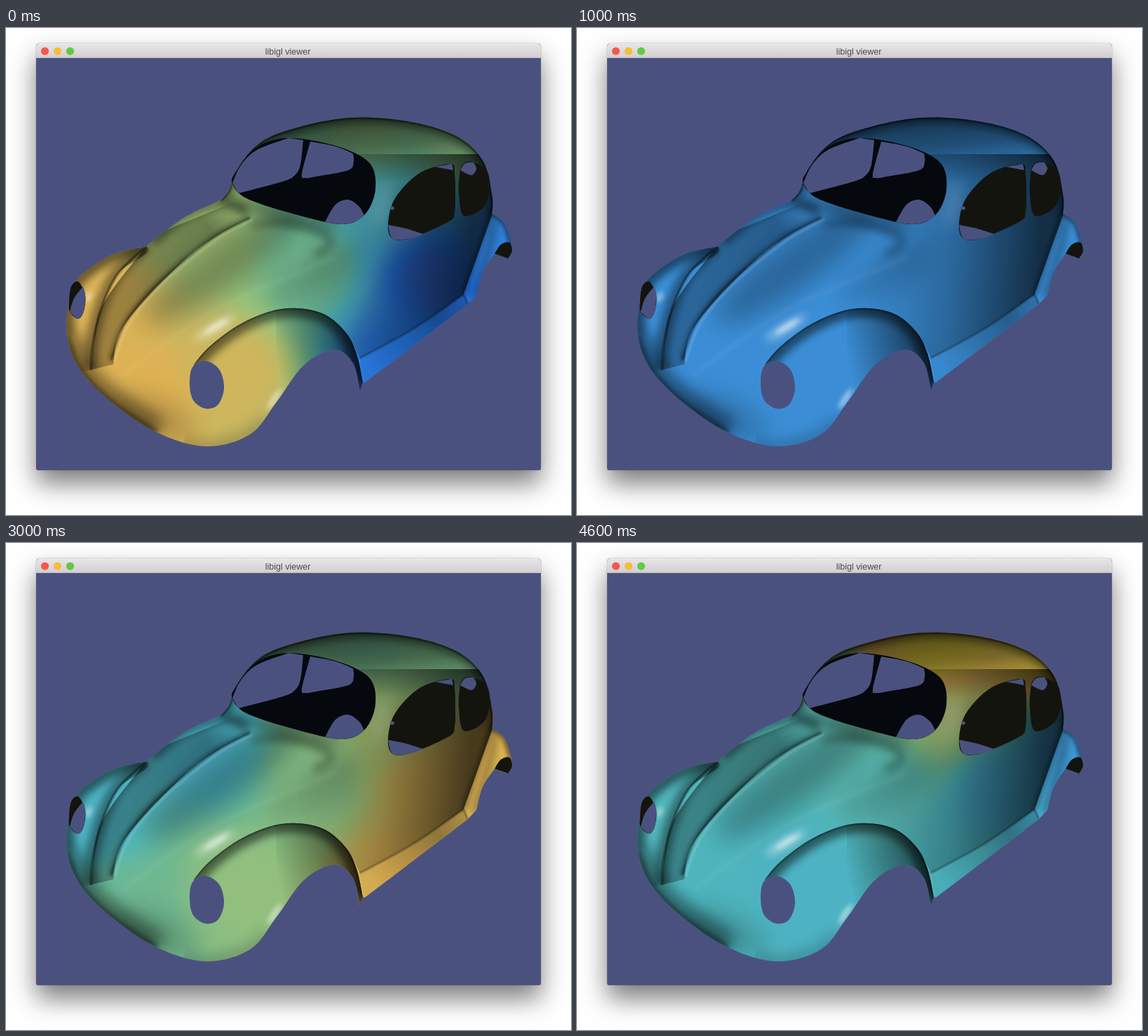
An HTML page with a canvas that plays this animation: 806 by 695 pixels, repeating every 5 s.

```html
<!DOCTYPE html>
<html lang="en">
<head>
<meta charset="utf-8">
<title>libigl viewer</title>
<style>
  html, body { margin: 0; width: 100%; height: 100%; overflow: hidden; background: #fff; }
  .window {
    position: absolute; left: 43px; top: 22px; width: 720px; height: 609px;
    border-radius: 5px 5px 3px 3px; background: #4b517f;
    box-shadow: 0 19px 36px rgba(0,0,0,.52), 0 0 2px rgba(0,0,0,.35);
  }
  .bar {
    height: 20px; border-bottom: 1px solid #b4b2b5; border-radius: 5px 5px 0 0;
    background: linear-gradient(#efedef, #e6e4e6 8%, #d1cfd1);
  }
  .paint, svg { position: absolute; left: 0; top: 0; width: 806px; height: 695px; }
  .paint { clip-path: url(#body); }
  canvas {
    position: absolute; left: 86px; top: 127px; width: 640px; height: 472px;
    animation: turn 5s step-end infinite;
  }
  @keyframes turn { 0% { opacity: 1; } 20%, 100% { opacity: 0; } }
  text { font: 12.5px "Liberation Sans", Arial, sans-serif; fill: #4c4a4c; text-anchor: middle; }
  .line { fill: none; stroke: #000; }
  .lit { stroke: #fff; }
  .b1 { filter: blur(1px); }
  .b3 { filter: blur(3px); }
  .b6 { filter: blur(6px); }
  .b10 { filter: blur(10px); }
  .b18 { filter: blur(18px); }
  .gap { fill: #4b517f; }
  .cabin { fill: #05080d; }
  .side { fill: #14140e; }
</style>
</head>
<body>
<div class="window"><div class="bar"></div></div>
<div class="paint"></div>
<svg viewBox="0 0 806 695">
  <defs>
    <clipPath id="body"><path data-p="200,312 158,321 125,339 100,361 90,390 87,440 106,488 152,535 215,577 285,597 348,580 385,535 425,481 468,459 495,478 505,518|509,505|512,506|659,394|671,381|680,348 697,322|715,329|722,314 711,279 693,265|694,242 680,189 640,153 572,133 490,128 412,143 362,164 330,201 318,232 306,246|255,270 212,302 200,312"/></clipPath>
    <clipPath id="door"><path data-p="400,330|500,180|694,180|694,265|653,380|580,430 505,471|485,435 455,409 415,400|400,330"/></clipPath>
    <clipPath id="fender"><path data-p="250,620|268,480|290,455 330,425 375,405 415,400 455,409 485,435 500,465 509,505|505,540|250,620"/></clipPath>
    <clipPath id="flank"><path data-p="60,300|200,312 160,350 136,400 124,450 121,488|60,500|60,300"/></clipPath>
    <clipPath id="hood"><path data-p="200,312 136,400 121,488|153,480|168,425 248,337 300,297 350,270|370,230|200,300|200,312"/></clipPath>

    <path id="roofline" data-p="306,246 318,232 330,201 362,164 412,143 490,128 572,133 640,153 680,189 694,242 693,265"/>
    <path id="arch" data-p="268,480 290,455 330,425 375,405 415,400 455,409 485,435 500,465 509,505"/>
    <path id="seam" data-p="200,312 160,350 136,400 124,450 121,488"/>
    <path id="crease" data-p="150,474 168,425 204,378 248,337 300,297 348,271"/>
    <path id="belly" data-p="87,440 106,488 152,535 215,577"/>

    <linearGradient id="roofShade" gradientUnits="userSpaceOnUse" x1="500" y1="128" x2="510" y2="225">
      <stop offset="0" stop-opacity=".62"/><stop offset=".45" stop-opacity=".44"/><stop offset="1" stop-opacity="0"/>
    </linearGradient>
    <linearGradient id="doorShade" gradientUnits="userSpaceOnUse" x1="415" y1="330" x2="660" y2="350">
      <stop offset="0" stop-opacity="0"/><stop offset=".5" stop-opacity=".28"/><stop offset="1" stop-opacity=".68"/>
    </linearGradient>
    <linearGradient id="hoodShade" gradientUnits="userSpaceOnUse" x1="180" y1="380" x2="348" y2="262">
      <stop offset="0" stop-opacity=".28"/><stop offset=".7" stop-opacity=".34"/><stop offset="1" stop-opacity="0"/>
    </linearGradient>
    <linearGradient id="archShade" gradientUnits="userSpaceOnUse" x1="385" y1="470" x2="505" y2="440">
      <stop offset="0" stop-opacity="0"/><stop offset="1" stop-opacity=".68"/>
    </linearGradient>
    <linearGradient id="sillShade" gradientUnits="userSpaceOnUse" x1="520" y1="480" x2="655" y2="385">
      <stop offset="0" stop-opacity=".04"/><stop offset=".7" stop-opacity=".34"/><stop offset="1" stop-opacity=".2"/>
    </linearGradient>
  </defs>

  <circle cx="55.5" cy="33" r="5.6" fill="#f4584f"/>
  <circle cx="73.5" cy="33" r="5.6" fill="#f9bc36"/>
  <circle cx="91.5" cy="33" r="5.6" fill="#62c942"/>
  <text x="402" y="38">libigl viewer</text>

  <g clip-path="url(#body)">
    <!-- roof -->
    <rect x="325" y="120" width="375" height="110" fill="url(#roofShade)"/>
    <use href="#roofline" class="line b6" stroke-width="16" opacity=".42"/>
    <use href="#roofline" class="line b1" stroke-width="5" opacity=".5"/>

    <!-- side panel and sill -->
    <rect x="400" y="180" width="300" height="300" fill="url(#doorShade)" clip-path="url(#door)"/>
    <path fill="url(#sillShade)" data-p="505,471 580,430 653,380|659,394|512,506|505,471"/>
    <path class="line b1" stroke-width="2" opacity=".45" data-p="505,471 580,430 653,380|659,394"/>
    <path class="line b3" stroke-width="6" opacity=".4" data-p="692,262 653,380"/>
    <path class="line b3" stroke-width="8" opacity=".5" data-p="693,264 711,278 723,314"/>
    <path class="line b6" stroke-width="12" opacity=".3" data-p="697,270 690,310 668,385"/>

    <!-- hood -->
    <ellipse class="b18" cx="320" cy="330" rx="150" ry="34" transform="rotate(-36 320 330)" opacity=".28"/>
    <ellipse class="b18" cx="440" cy="350" rx="75" ry="28" transform="rotate(-32 440 350)" opacity=".16"/>
    <g clip-path="url(#hood)">
      <rect x="110" y="230" width="260" height="270" fill="url(#hoodShade)"/>
      <use href="#seam" class="line b6" stroke-width="16" opacity=".4"/>
      <use href="#crease" class="line b3" stroke-width="8" opacity=".35"/>
    </g>
    <path class="line b6" stroke-width="14" opacity=".42" data-p="208,305 255,268 310,250 345,262"/>
    <path class="line b10" stroke-width="18" opacity=".36" data-p="318,240 380,262 470,285"/>
    <use href="#seam" class="line b1" stroke-width="2.5" opacity=".65"/>
    <use href="#crease" class="line b1" stroke-width="2" opacity=".5"/>
    <use href="#crease" class="line lit b1" stroke-width="3" opacity=".15" transform="translate(5 2)"/>
    <path class="line b6" stroke-width="9" opacity=".28" data-p="350,282 390,278 440,288 464,306 440,324"/>
    <path class="line lit b3" stroke-width="4" opacity=".08" data-p="163,498 300,402 470,328"/>

    <!-- left fender and nose -->
    <g clip-path="url(#flank)">
      <path class="line b6" stroke-width="22" opacity=".5" data-p="200,310 158,321 125,339 100,361 89,390 86,440"/>
      <use href="#seam" class="line b6" stroke-width="22" opacity=".4"/>
    </g>
    <use href="#belly" class="line b10" stroke-width="40" opacity=".42"/>
    <use href="#belly" class="line b3" stroke-width="8" opacity=".4"/>
    <ellipse class="b18" cx="210" cy="555" rx="65" ry="26" transform="rotate(25 210 555)" opacity=".2"/>

    <!-- right fender -->
    <g clip-path="url(#fender)">
      <rect x="385" y="395" width="130" height="130" fill="url(#archShade)"/>
      <use href="#arch" class="line b6" stroke-width="26" opacity=".5"/>
      <use href="#arch" class="line b1" stroke-width="3" opacity=".5"/>
      <path class="line b10" stroke-width="20" opacity=".22" data-p="250,596 290,600 348,584 372,560"/>
    </g>

    <!-- glints -->
    <g fill="#fff">
      <ellipse class="b6" cx="298" cy="428" rx="34" ry="8" transform="rotate(-31 298 428)" opacity=".34"/>
      <ellipse class="b3" cx="300" cy="426" rx="20" ry="4" transform="rotate(-31 300 426)" opacity=".5"/>
      <ellipse class="b3" cx="383" cy="529" rx="17" ry="4" transform="rotate(-56 383 529)" opacity=".5"/>
      <ellipse class="b3" cx="118" cy="384" rx="4" ry="8" transform="rotate(25 118 384)" opacity=".45"/>
      <ellipse class="b10" cx="536" cy="252" rx="9" ry="34" transform="rotate(14 536 252)" opacity=".16"/>
    </g>
  </g>

  <!-- openings -->
  <path class="cabin" data-p="323,222 329,204 358,170 403,157 470,168 518,192 527,230 512,266 480,280 420,268 345,244 323,222"/>
  <path class="gap" data-p="323,221 335,196 358,174 403,157|424,160|420,195 412,210 395,219 331,236|323,221"/>
  <path class="gap" data-p="434,162|470,169 495,179|496,191 488,203 442,212 427,214 422,208 434,162"/>
  <path class="gap" data-p="455,277|470,252 488,245 504,255 511,268|498,276 480,280 455,277"/>

  <path class="side" data-p="545,280 555,243 590,207 634,194 640,208 641,235 640,262 632,276 580,299 552,301 545,280"/>
  <path class="gap" data-p="545,281|570,286 595,294|578,300 552,301 545,281"/>
  <path class="gap" data-p="612,198|636,194|638,203|612,198"/>
  <ellipse class="gap" cx="551" cy="257" rx="3" ry="2.5"/>

  <path class="side" data-p="647,210 650,197 660,191 684,201 690,225 682,255 653,268 646,235 647,210"/>
  <path class="gap" data-p="648,203|655,193 667,192|671,201 664,210 648,203"/>

  <path class="side" data-p="697,322|706,309 718,306 722,318 716,329|697,322"/>

  <path class="side" data-p="90,390 93,369 103,362 113,381 111,404 103,415 91,405 90,390"/>
  <path class="gap" data-p="91,405|97,386 110,369|113,381 111,404 103,415 91,405"/>
  <path class="gap" data-p="262,508 266,484 284,475 304,487 311,514 302,538 284,543 267,531 262,508"/>
</svg>

<script>
// Smooth curve through "x,y" points; "|" marks a corner.
function trace(text) {
  let d = '', last = null;
  for (const part of text.split('|')) {
    const p = part.trim().split(' ').map(s => s.split(',').map(Number));
    if (last) p.unshift(last); else d = 'M' + p[0];
    const n = p.length;
    last = p[n - 1];
    const loop = n > 2 && String(p[0]) === String(last);
    const bend = (from, a, b, k) => from.map((v, j) => v + k * (b[j] - a[j]) / 6);
    for (let i = 0; i < n - 1; i++) {
      const b = p[i], c = p[i + 1];
      const a = p[i - 1] || (loop ? p[n - 2] : b);
      const e = p[i + 2] || (loop ? p[1] : c);
      d += `C${bend(b, a, c, 1)} ${bend(c, b, e, -1)} ${c}`;
    }
  }
  return d;
}
for (const el of document.querySelectorAll('[data-p]')) el.setAttribute('d', trace(el.dataset.p));

// Each scalar field is blended from its values at a few landmarks, then colour mapped.
const spots = {
  nose: [190, 520], fender: [330, 490], flank: [120, 390], hood: [290, 290],
  cowl: [440, 340], pillar: [530, 250], roof: [520, 150], back: [650, 165],
  door: [600, 350], sill: [560, 470], tail: [705, 290]
};
const fields = [
  { nose: .88, fender: .85, flank: .87, hood: .76, cowl: .63, pillar: .46, roof: .7, back: .7, door: .05, sill: .14, tail: .2 },
  { hood: .26 },
  { nose: .03, fender: .12, flank: .13, hood: .22, cowl: .22, pillar: .4, roof: .7, back: .75, door: .43, sill: .43, tail: .74 },
  { nose: .62, fender: .72, flank: .46, hood: .44, cowl: .68, pillar: .77, roof: .63, back: .65, door: .87, sill: .88, tail: .89 },
  { nose: .49, fender: .46, flank: .5, hood: .52, cowl: .53, pillar: .78, roof: .98, back: .94, door: .38, sill: .48, tail: .29 }
];
const ramp = ['#3c55b4', '#2372e0', '#3a8cd6', '#46a8d2', '#50b6bc', '#70b890', '#9ec278', '#deb255', '#d6cc30']
  .map(hex => [1, 3, 5].map(i => parseInt(hex.slice(i, i + 2), 16)));

function tint(v) {
  const pos = v * (ramp.length - 1), i = Math.min(Math.floor(pos), ramp.length - 2);
  return ramp[i].map((c, k) => c + (ramp[i + 1][k] - c) * (pos - i));
}

function blend(field, x, y) {
  let sum = 0, total = 0;
  for (const name in field) {
    const [sx, sy] = spots[name];
    const w = ((x - sx) ** 2 + (y - sy) ** 2 + 2000) ** -2;
    sum += w * field[name];
    total += w;
  }
  return sum / total;
}

const W = 80, H = 59, CELL = 8;
fields.forEach((field, index) => {
  const canvas = document.createElement('canvas');
  canvas.width = W;
  canvas.height = H;
  canvas.style.animationDelay = `${index - fields.length}s`;
  const ctx = canvas.getContext('2d');
  const img = ctx.createImageData(W, H);
  for (let k = 0; k < W * H; k++) {
    const x = 86 + CELL * (k % W + .5), y = 127 + CELL * (Math.floor(k / W) + .5);
    img.data.set([...tint(blend(field, x, y)), 255], k * 4);
  }
  ctx.putImageData(img, 0, 0);
  document.querySelector('.paint').append(canvas);
});
</script>
</body>
</html>
```
